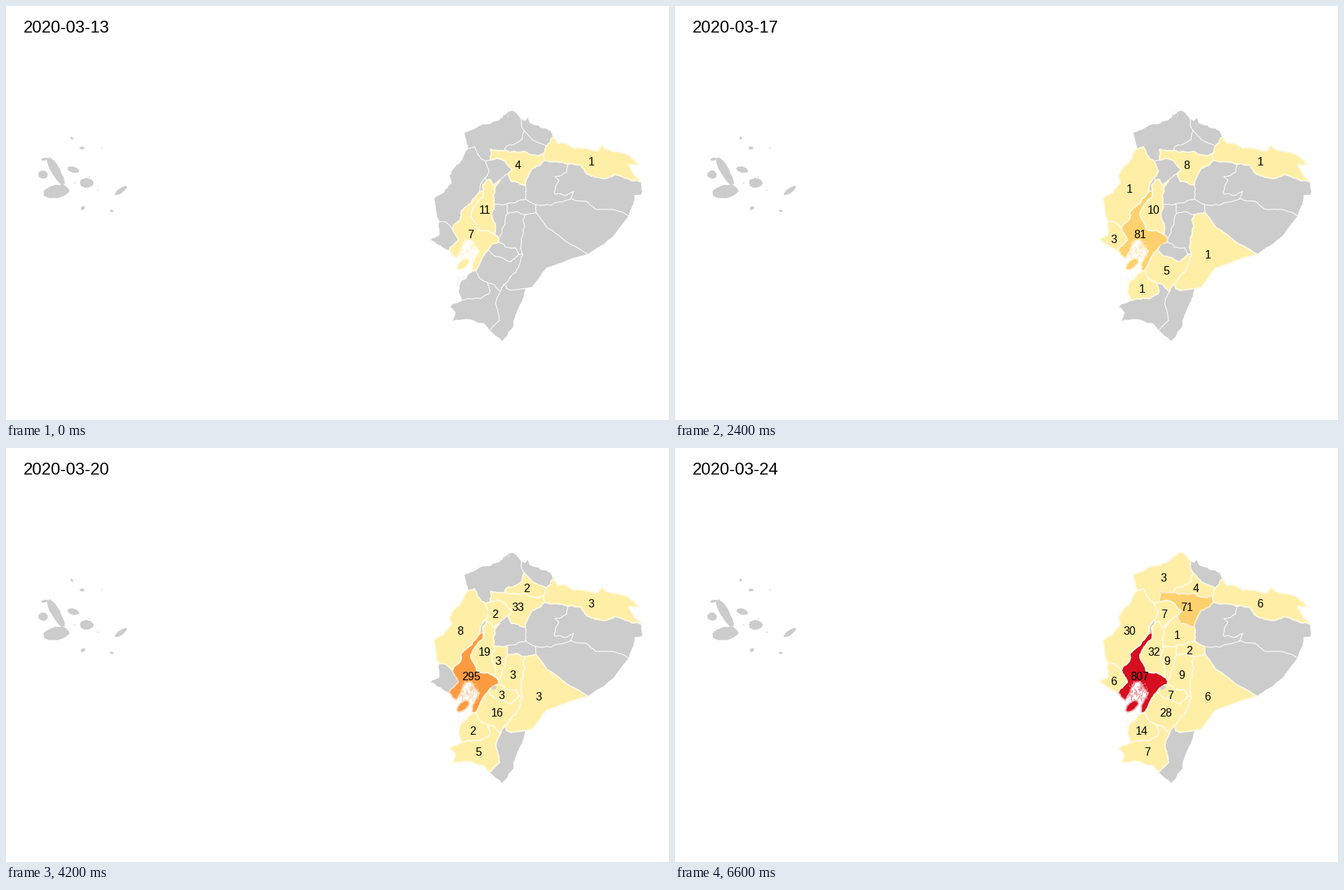
Animation of 947x592 px, one loop 7600 ms. Source, as a matplotlib script:

```python
import random
from itertools import combinations

import matplotlib.pyplot as plt
import numpy as np
from matplotlib.animation import FuncAnimation
from matplotlib.collections import LineCollection
from matplotlib.colors import to_rgb
from matplotlib.patches import Polygon

W, H, DPI = 947, 592, 100
PX = 72 / DPI
DAYS, HOLD = 12, 3
FONT = "Liberation Sans"
GREY = "#CCCCCC"
LEVELS = [(50, "#FFEEA6"), (200, "#FED16E"), (500, "#FD9B42"),
          (800, "#FC4D2A"), (9999, "#D50F20")]

rng = random.Random(7)

# Points where three regions meet
NODES = {
    "ES MA sea": (660, 204), "CA ES sea": (735, 160), "CA ES IM": (740, 178),
    "ES IM PI": (711, 207), "ES PI SD": (692, 220), "ES MA SD": (685, 222),
    "CA IM SU": (772, 200), "CA SU sea": (782, 187), "IM PI SU": (769, 210),
    "NA PI SU": (769, 221), "NA OR SU": (803, 226), "OR SU sea": (908, 252),
    "OR PA sea": (890, 300), "NA OR PA": (806, 276), "NA PA TU": (756, 284),
    "CO NA TU": (742, 276), "CO NA PI": (742, 256), "CO PI SD": (717, 240),
    "CO LR SD": (705, 249), "MA SD Z1": (684, 246), "LR SD Z1": (686, 249),
    "GU MA Z1": (676, 266), "GU LR Z1": (682, 264), "BO CO LR": (697, 283),
    "BO CO TU": (715, 283), "BO CH TU": (716, 297), "CH MO TU": (742, 298),
    "MO PA TU": (757, 295), "MO PA sea": (832, 355), "BO GU LR": (698, 327),
    "BO CH GU": (704, 333), "CH CN GU": (704, 338), "AZ CN GU": (689, 348),
    "AZ CH CN": (733, 355), "AZ CH MO": (738, 355), "AZ MO ZA": (711, 398),
    "AZ LO ZA": (706, 409), "AZ EO LO": (687, 395), "AZ EO GU": (671, 378),
    "EO GU sea": (666, 379), "EO LO sea": (651, 421), "LO ZA sea": (690, 464),
    "MO ZA sea": (742, 404), "GU MA SE": (637, 318), "MA SE sea": (619, 308),
    "GU SE sea": (632, 350),
}
STRAIGHT = {"PA sea", "MO sea", "MO PA"}
bends = {}
cases = {}


def bend(pair, *xy):
    """Turning points of a border, from its first node to its second."""
    bends[pair] = list(zip(xy[::2], xy[1::2]))


bend("ES sea", 657, 192, 654, 181, 680, 169, 704, 163, 723, 149)
bend("CA sea", 741, 164, 745, 159, 750, 168, 778, 178)
bend("SU sea", 788, 197, 812, 204, 846, 207, 851, 199, 873, 208, 905, 227,
     889, 227, 897, 241)
bend("OR sea", 908, 270, 898, 271)
bend("PA sea", 867, 330)
bend("MO sea", 772, 375, 752, 402)
bend("ZA sea", 709, 480, 725, 459, 740, 416)
bend("LO sea", 633, 431, 642, 438, 637, 451, 656, 448, 682, 454)
bend("EO sea", 648, 398)
bend("GU sea", 676, 350, 664, 334, 656, 336, 643, 361)
bend("SE sea", 619, 326, 606, 334, 624, 346)
bend("MA sea", 651, 220, 633, 243, 636, 254, 611, 275, 614, 292)

bend("ES MA", 669, 201, 677, 216)
bend("ES IM", 737, 191, 716, 200)
bend("ES PI", 692, 205)
bend("CA IM", 750, 189)
bend("IM PI", 741, 208, 752, 213)
bend("OR SU", 820, 227, 836, 243, 880, 244)
bend("NA OR", 801, 237, 784, 244, 790, 249, 784, 269, 811, 265)
bend("OR PA", 866, 291, 841, 290, 818, 279)
bend("NA PI", 752, 232)
bend("CO PI", 722, 251)
bend("PI SD", 711, 221, 723, 234)
bend("MA SD", 690, 237)
bend("LR SD", 695, 257, 692, 248)
bend("MA Z1", 678, 254)
bend("GU MA", 667, 276, 650, 294, 649, 305)
bend("GU LR", 682, 272, 664, 298, 673, 319, 688, 321)
bend("MA SE", 628, 309)
bend("GU SE", 646, 335)
bend("CO LR", 696, 271)
bend("BO LR", 694, 296)
bend("BO CH", 710, 316)
bend("CH TU", 730, 294)
bend("CH CN", 713, 345, 728, 346)
bend("CH MO", 738, 328)
bend("MO PA", 773, 317, 802, 338)
bend("AZ CN", 697, 357, 721, 366)
bend("AZ GU", 678, 364)
bend("AZ EO", 676, 389)
bend("AZ MO", 732, 374)
bend("AZ LO", 698, 399)
bend("EO LO", 690, 411, 664, 419)
bend("LO ZA", 705, 450)
bend("MO ZA", 715, 404)


def wiggle(a, b, amount):
    """Ragged line by midpoint displacement, without its last point."""
    dx, dy = b[0] - a[0], b[1] - a[1]
    if np.hypot(dx, dy) < 3.5:
        return [a]
    s = rng.gauss(0, amount)
    mid = ((a[0] + b[0]) / 2 - dy * s, (a[1] + b[1]) / 2 + dx * s)
    return wiggle(a, mid, amount) + wiggle(mid, b, amount)


def border(pair):
    """Line between the two nodes that both regions share."""
    ends = [p for key, p in NODES.items() if set(pair) <= set(key.split())]
    name = " ".join(pair)
    points = [ends[0], *bends.get(name, []), ends[1]]
    amount = 0.02 if name in STRAIGHT else 0.07
    line = [p for a, b in zip(points, points[1:]) for p in wiggle(a, b, amount)]
    return line + [ends[1]]


def ring(code):
    """Chain all borders of a region into one outline."""
    parts = [line for pair, line in borders.items() if code in pair]
    path = list(parts.pop())
    while parts:
        part = next(p for p in parts if path[-1] in (p[0], p[-1]))
        parts.remove(part)
        path += part[1:] if part[0] == path[-1] else part[-2::-1]
    return path


pairs = sorted({pair for key in NODES for pair in combinations(key.split(), 2)})
borders = {pair: border(pair) for pair in pairs}


def count(code, x, y, keys):
    """Label place, and counts that grow evenly between key days."""
    days = np.arange(DAYS)
    values = np.interp(days, list(keys), list(keys.values()), left=0)
    cases[code] = (x, y, np.floor(values + 1e-6).astype(int))


count("GU", 664, 326, {0: 7, 2: 19, 4: 81, 6: 187, 8: 403, 9: 607, 11: 807})
count("PI", 731, 227, {0: 4, 4: 8, 6: 16, 8: 50, 9: 60, 11: 71})
count("LR", 684, 291, {0: 11, 2: 10, 4: 10, 6: 16, 8: 22, 11: 32})
count("SU", 836, 222, {0: 1, 5: 1, 7: 3, 8: 3, 9: 6})
count("AZ", 701.5, 378, {1: 1, 3: 1, 4: 5, 5: 5, 6: 14, 8: 19, 9: 19, 11: 28})
count("MA", 649, 261, {4: 1, 6: 8, 8: 9, 9: 25, 11: 30})
count("SE", 627, 333, {4: 3, 5: 0, 6: 0, 8: 1, 9: 2, 11: 6})
count("MO", 761, 355, {4: 1, 5: 1, 6: 3, 9: 3, 10: 6})
count("EO", 667, 404, {4: 1, 6: 1, 7: 2, 8: 2, 9: 6, 11: 14})
count("IM", 744, 200, {6: 1, 9: 4})
count("SD", 699, 237, {6: 1, 8: 4, 9: 4, 11: 7})
count("BO", 703, 304, {6: 2, 8: 5, 9: 8, 10: 9})
count("CH", 724, 324, {6: 2, 8: 4, 9: 9})
count("CN", 708, 353, {6: 3, 8: 3, 9: 4, 11: 7})
count("LO", 675, 434, {6: 4, 7: 5, 10: 5, 11: 7})
count("ES", 698, 185, {8: 2, 11: 3})
count("CO", 717, 267, {10: 1})
count("TU", 735, 289, {10: 1, 11: 2})


def shade(n):
    return next(c for top, c in LEVELS if n <= top) if n else GREY


def pale(color, keep):
    return tuple(1 - keep * (1 - v) for v in to_rgb(color))


fig = plt.figure(figsize=(W / DPI, H / DPI), dpi=DPI, facecolor="white")
ax = fig.add_axes([0, 0, 1, 1])
ax.set_xlim(0, W)
ax.set_ylim(H, 0)
ax.axis("off")


def shape(points, edge="white", z=1):
    patch = Polygon(points, closed=True, fc=GREY, ec=edge, lw=0.9 * PX,
                    joinstyle="round", zorder=z)
    return ax.add_patch(patch)


def blob(x, y, w, h, turn=0, z=1):
    """Small island: a tilted ellipse with an uneven shore."""
    t = np.linspace(0, 2 * np.pi, 20, endpoint=False)
    r = np.array([rng.uniform(0.9, 1.05) for _ in t]) / 2
    u, v, a = w * r * np.cos(t), h * r * np.sin(t), np.radians(turn)
    return shape(np.c_[x + u * np.cos(a) - v * np.sin(a),
                       y + u * np.sin(a) + v * np.cos(a)], edge="none", z=z)


def flecks(n, x0, x1, y0, y1, size):
    """Tiny strokes standing for mangrove islets."""
    lines = []
    for _ in range(n):
        x, y = rng.uniform(x0, x1), rng.uniform(y0, y1)
        lines.append([(x, y), (x + rng.uniform(-size, size) / 2,
                               y + rng.uniform(-size, size))])
    group = LineCollection(lines, colors=GREY, linewidths=0.9 * PX, zorder=4)
    return ax.add_collection(group)


# Western archipelago
for isle in [(72, 265, 38, 19, -10), (71, 236, 46, 13, 61), (55, 219, 10, 4, -10),
             (53, 241, 14, 12), (96, 234, 17, 9, 15), (115, 253, 20, 14),
             (164, 264, 21, 7, -35), (110, 289, 7, 5, -30), (151, 293, 6, 3, 15),
             (94, 189, 5, 3, 60), (108.5, 203, 7, 4)]:
    blob(*isle)
for x, y in [(136.5, 203), (131, 263.5), (119, 244.5), (98, 253)]:
    blob(x, y, 1.8, 1.8)

codes = sorted({c for key in NODES for c in key.split()} - {"sea"})
regions = {c: [shape(ring(c))] for c in codes}
regions["GU"].append(blob(653, 369, 22, 11, -40))
blob(697, 343, 8, 5, -25, z=4)
islets = {"GU": flecks(80, 650, 675, 335, 360, 5),
          "EO": flecks(16, 643, 660, 386, 399, 3),
          "ES": flecks(8, 709, 719, 150, 160, 4)}

labels = {c: ax.text(x, y + 6, "", family=FONT, size=16 * PX, ha="center",
                     va="baseline", zorder=9) for c, (x, y, _) in cases.items()}
date = ax.text(25, 38, "", family=FONT, size=24 * PX, va="baseline", zorder=9)


def draw(i):
    day = min(i // HOLD, DAYS - 1)
    date.set_text(f"2020-03-{13 + day}")
    for code, (_, _, values) in cases.items():
        n = values[day]
        color = shade(n)
        for patch in regions[code]:
            patch.set_facecolor(color)
            patch.set_edgecolor(pale(color, 0.35) if n else "white")
            patch.set_linewidth((2 if n else 0.9) * PX)
            patch.set_zorder((2 if code == "GU" else 3) if n else 1)
        if code in islets:
            islets[code].set_color(pale(color, 0.55))
        labels[code].set_text(str(n) if n else "")
    return [date, *labels.values()]


anim = FuncAnimation(fig, draw, frames=38, interval=200, repeat=True, blit=False)
plt.show()
```
